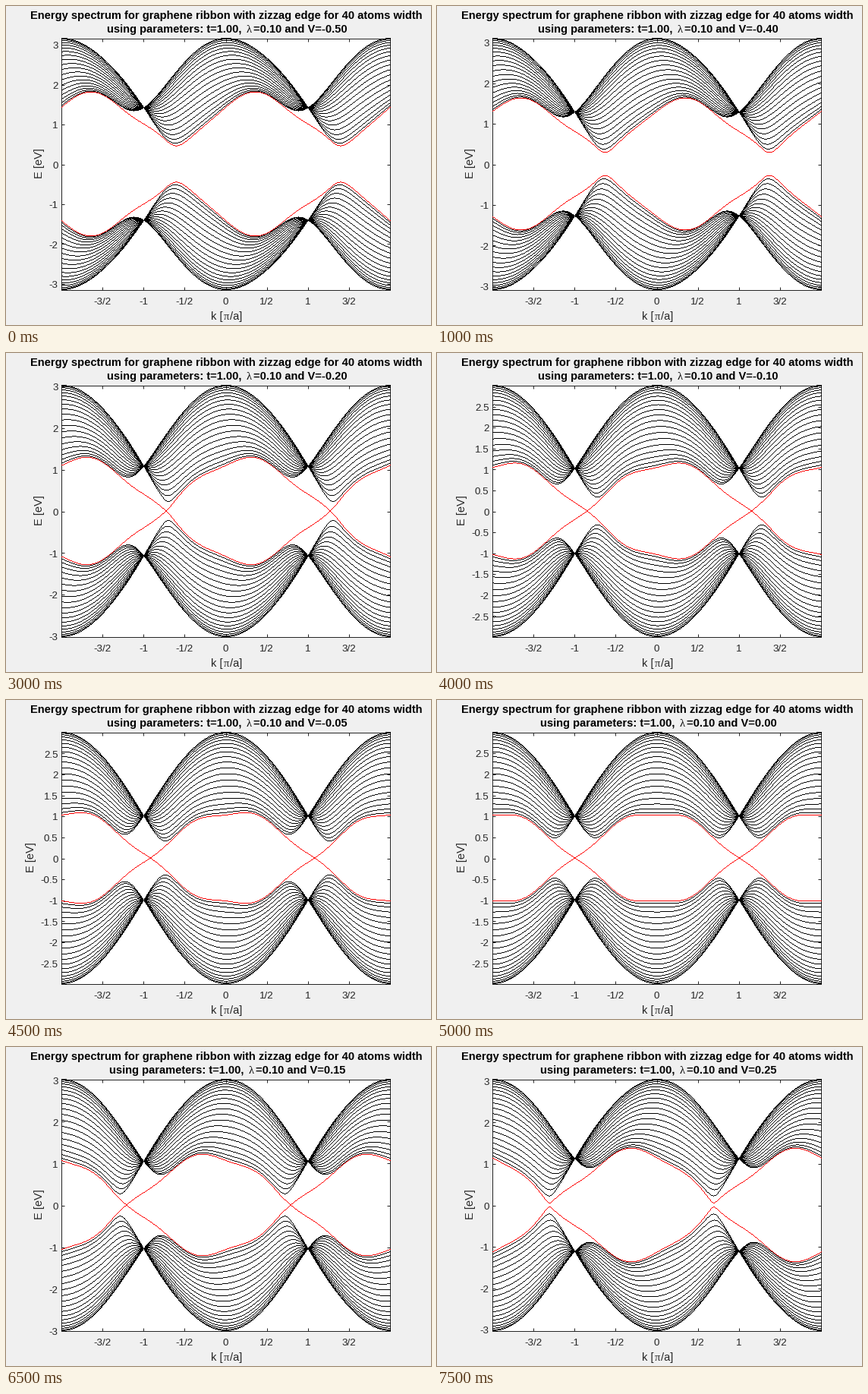
A matplotlib script for the animation above (8 s loop, 560 by 420 pixels).

```python
import numpy as np
import matplotlib.pyplot as plt
from matplotlib.animation import FuncAnimation

W, H = 560, 420
LEFT, RIGHT, TOP, BOTTOM = 73, 506, 42, 373    # pixels of the axes box
COLS, ROWS = RIGHT - LEFT + 1, BOTTOM - TOP + 1
CX, CY = (LEFT + RIGHT) / 2, (TOP + BOTTOM) / 2
HALF = (BOTTOM - TOP) / 2
INK = (0.15, 0.15, 0.15)
PT = 72 / 80          # points per pixel at 80 dpi
BIG, SMALL = 14.667 * PT, 13.333 * PT
BLACK, RED = (0, 0, 0, 255), (255, 0, 0, 255)

T, LAM, ATOMS, STEPS = 1.0, 0.1, 40, 16
k = np.linspace(-2, 2, COLS)


def bands(v):
    """Energies of the zigzag ribbon for every k, sorted, shape (len(k), ATOMS)."""
    q = k * np.pi
    c, s = np.cos(q / 2), np.sin(q)
    ham = np.zeros((len(k), ATOMS, ATOMS))
    for i in range(ATOMS):
        sign = 1 if i % 2 == 0 else -1
        ham[:, i, i] = sign * (2 * v - 4 * LAM * s)
        if i + 1 < ATOMS:
            ham[:, i + 1, i] = 2 * T * c if i % 2 == 0 else T
        if i + 2 < ATOMS:
            ham[:, i + 2, i] = sign * 2 * LAM * s * c
    return np.linalg.eigvalsh(ham)     # reads the lower triangle


def trace(img, heights, color):
    """Draw a hard one-pixel curve, heights running from -1 to 1."""
    rows = np.rint(HALF * (1 - heights)).astype(int)
    cols = np.arange(COLS)
    img[rows, cols] = color
    steep = np.flatnonzero(np.abs(np.diff(rows)) > 1)
    img[(rows[steep] + rows[steep + 1]) // 2, steep] = color


fig = plt.figure(figsize=(7, 5.25), dpi=80, facecolor="#f0f0f0")
ax = fig.add_axes([LEFT / W, (H - 1 - BOTTOM) / H,
                   (RIGHT - LEFT) / W, (BOTTOM - TOP) / H])
ax.set_xlim(-2, 2)
ax.tick_params(direction="in", length=4.4 * PT, width=PT, color=INK,
               top=True, right=True, labelbottom=False, labelleft=False)
for spine in ax.spines.values():
    spine.set(linewidth=PT, color=INK)

# Curves go on a transparent pixel layer above the axes
layer = fig.figimage(np.zeros((ROWS, COLS, 4), np.uint8), xo=LEFT,
                     yo=H - 1 - BOTTOM, origin="upper", zorder=2)


def put(x, y, text, size=BIG, color=INK, font="Liberation Sans", **kw):
    kw = {"ha": "center", "va": "baseline", **kw}
    return fig.text(x / W, 1 - y / H, text, fontsize=size, color=color,
                    family=font, **kw)


# Fixed text
bold = dict(color="black", weight="bold")
put(290, 17, "Energy spectrum for graphene ribbon with zizzag edge "
    "for 40 atoms width", **bold)
put(270.3, 413, "k [", ha="left")
put(290.3, 413, "π", font="Liberation Serif")
put(311, 413, "/a]", ha="right")

xticks = np.arange(-1.5, 1.6, 0.5)
ax.set_xticks(xticks)
for x, name in zip(xticks, ["-3/2", "-1", "-1/2", "0", "1/2", "1", "3/2"]):
    put(CX + x * (RIGHT - LEFT) / 4, 393, name, SMALL)

# Changing text
head = put(0, 35, f"using parameters: t={T:.2f},", ha="left", **bold)
lam = put(0, 35, "λ", color="black", font="Liberation Serif")
tail = put(0, 35, "", ha="right", **bold)
ylabel = put(0, CY, "E [eV]", rotation=90, rotation_mode="anchor")
ynames = [put(68.6, 0, "", SMALL, ha="right") for _ in range(11)]


def update(i):
    v = (i - STEPS + 6) / 20
    energy = bands(v)
    top = energy.max()
    edges = (ATOMS // 2 - 1, ATOMS // 2)

    img = np.zeros((ROWS, COLS, 4), np.uint8)
    for n in range(ATOMS):
        if n not in edges:
            trace(img, energy[:, n] / top, BLACK)
    for n in edges:
        trace(img, energy[:, n] / top, RED)
    layer.set_data(img)

    # Half steps appear once 3 no longer fits on the axis
    fine = top < 3
    ticks = np.arange(-2.5, 2.6, 0.5) if fine else np.arange(-3, 4)
    ax.set_ylim(-top, top)
    ax.set_yticks(ticks)
    for label in ynames:
        label.set_text("")
    for label, y in zip(ynames, ticks):
        label.set_text(f"{y:g}")
        label.set_y(1 - (CY - y / top * HALF + 6.2) / H)
    ylabel.set_x((37 if fine else 48) / W)

    # The centred line is narrower without a minus sign
    shift = 0 if v < 0 else 2.4
    head.set_x((133.3 + shift) / W)
    lam.set_x((320.6 + shift) / W)
    tail.set_x((450 - shift) / W)
    tail.set_text(f"={LAM:.2f} and V={v:.2f}")
    return [layer]


anim = FuncAnimation(fig, update, frames=STEPS, interval=500,
                     init_func=lambda: update(0), repeat=True, repeat_delay=0)
plt.show()
```
